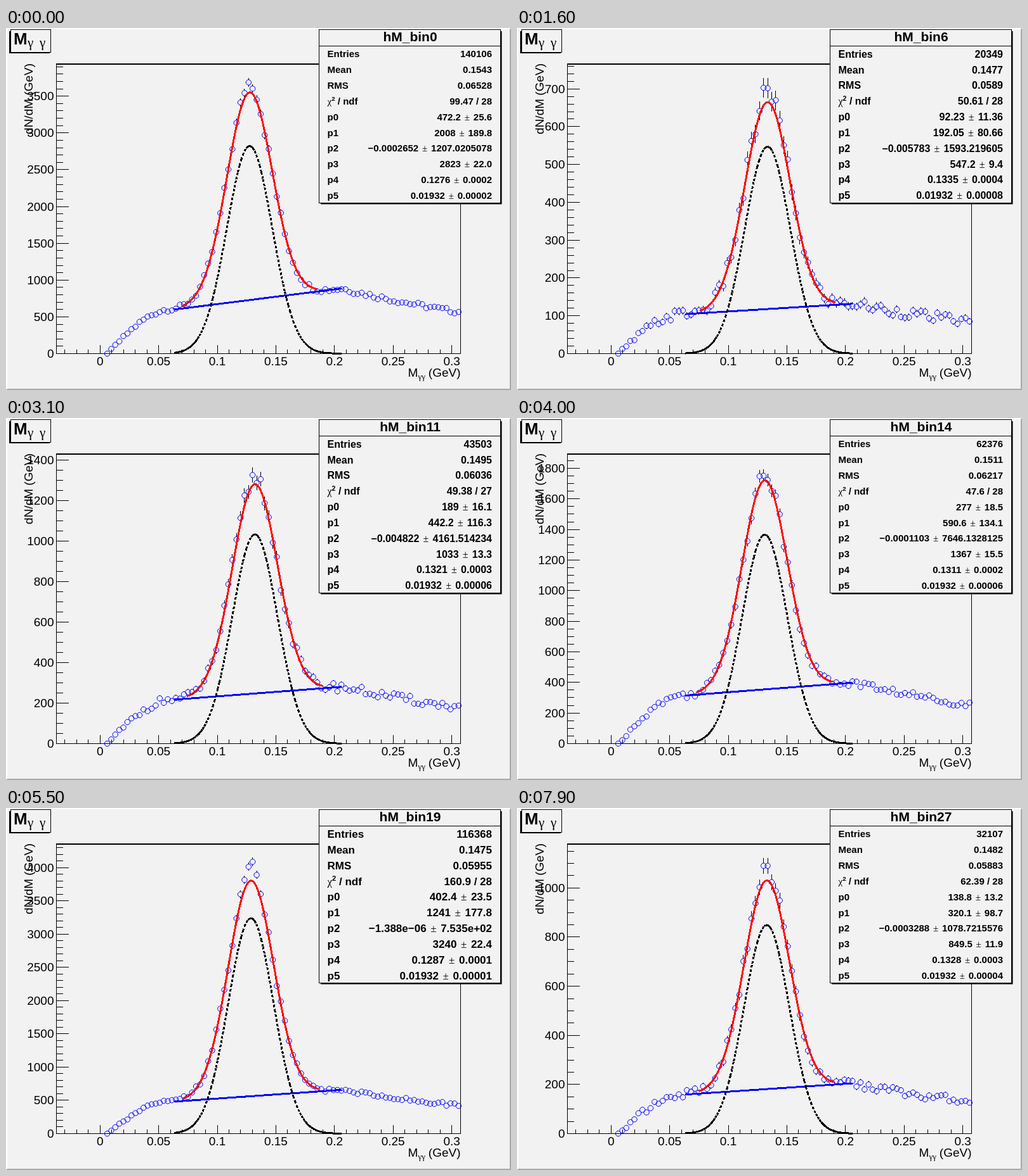
Write an HTML page that moves like this. It is 796 by 572 pixels and loops after 8 s.

```html
<!DOCTYPE html>
<html lang="en">
<head>
<meta charset="utf-8">
<title>Invariant mass fits</title>
<style>
html, body { margin: 0; width: 100%; height: 100%; overflow: hidden; background: #f2f2f2; }
svg { display: block; position: absolute; left: 0; top: 0; font: 19px "Liberation Sans", Arial, sans-serif; }
.sym { font-family: "Liberation Serif", "Times New Roman", serif; font-weight: normal; }
.bold { font-weight: bold; }
.end { text-anchor: end; }
.mid { text-anchor: middle; }
.thin { fill: none; stroke: #000; shape-rendering: crispEdges; }
.fit { fill: none; stroke-width: 3; shape-rendering: crispEdges; }
.box { fill: #f2f2f2; stroke: #000; shape-rendering: crispEdges; }
</style>
</head>
<body>
<svg id="stage" width="796" height="572" viewBox="0 0 796 572"></svg>
<script>
const LEFT = 80, RIGHT = 716.5, TOP = 56.5, BASE = 514.5;
const BIN_W = (RIGHT - LEFT) / 100;
const FIT_LO = .0632, FIT_HI = .2063, DATA_LO = .0064;
const LABELS = ['Entries', 'Mean', 'RMS', '', 'p0', 'p1', 'p2', 'p3', 'p4', 'p5'];

// Printed results of some fits; p0 to p5 also shape the curves. The fits between are blended.
const FITS = [
  { bin: 0, top: 3941, rows: ['140106', '0.1543', '0.06528', '99.47 / 28', '472.2 ± 25.6',
    '2008 ± 189.8', '-0.0002652 ± 1207.0205078', '2823 ± 22.0', '0.1276 ± 0.0002', '0.01932 ± 0.00002'] },
  { bin: 4, top: 530, rows: ['13301', '0.1471', '0.0588', '50.65 / 28', '67.05 ± 9.26',
    '91.21 ± 64.84', '-0.004329 ± 1429.742554', '371.4 ± 7.8', '0.1341 ± 0.0004', '0.01932 ± 0.00010'] },
  { bin: 9, top: 1121, rows: ['30921', '0.1485', '0.05915', '50.56 / 27', '130 ± 14.5',
    '343.3 ± 104.4', '-0.007963 ± 1838.435181', '811 ± 11.8', '0.1327 ± 0.0003', '0.01932 ± 0.00006'] },
  { bin: 14, top: 1895, rows: ['62376', '0.1511', '0.06217', '47.6 / 28', '277 ± 18.5',
    '590.6 ± 134.1', '-0.0001103 ± 7646.1328125', '1367 ± 15.5', '0.1311 ± 0.0002', '0.01932 ± 0.00006'] },
  { bin: 19, top: 4357, rows: ['116368', '0.1475', '0.05955', '160.9 / 28', '402.4 ± 23.5',
    '1241 ± 177.8', '-1.388e-06 ± 7.535e+02', '3240 ± 22.4', '0.1287 ± 0.0001', '0.01932 ± 0.00001'] },
  { bin: 23, top: 536.5, rows: ['16201', '0.1482', '0.06191', '46.43 / 30', '-40.83 ± 61.03',
    '2425 ± 1082.3', '-8368 ± 5720.1', '335.6 ± 16.1', '0.1316 ± 0.0005', '0.01932 ± 0.00054'] },
  { bin: 27, top: 1180, rows: ['32107', '0.1482', '0.05883', '62.39 / 28', '138.8 ± 13.2',
    '320.1 ± 98.7', '-0.0003288 ± 1078.7215576', '849.5 ± 11.9', '0.1328 ± 0.0003', '0.01932 ± 0.00004'] }
];

const lerp = (a, b, u) => a + (b - a) * u;
const px = x => 148.2 + 1848 * x;
const massAt = p => (p - 148.2) / 1848;

function noise(k, bin) {
  const s = Math.sin(k * 12.9898 + bin * 78.233) * 43758.5453;
  return (s - Math.floor(s)) * 2 - 1;
}

function mixText(a, b, u) {
  if (!u) return a;
  const other = b.split(' ');
  return a.split(' ').map((w, i) => isNaN(w) ? w :
    lerp(+w, +other[i], u).toFixed((w.split('.')[1] || '').length)).join(' ');
}

function fitOf(bin) {
  const i = FITS.findLastIndex(f => f.bin <= bin);
  const a = FITS[i], b = FITS[i + 1] || a;
  const u = a === b ? 0 : (bin - a.bin) / (b.bin - a.bin);
  const rows = a.rows.map((r, j) => mixText(r, b.rows[j], u));
  const [p0, p1, p2, p3, p4, p5] = rows.slice(4).map(parseFloat);
  const top = lerp(a.top, b.top, u);
  const back = x => p0 + p1 * x + p2 * x * x;
  const peak = x => p3 * Math.exp(-(((x - p4) / p5) ** 2) / 2);
  const total = x => back(x) + peak(x);
  return { bin, rows, top, scale: (BASE - TOP) / top, mean: p4, sigma: p5, back, peak, total };
}

const text = (x, y, s, cls = '', size = 19, more = '') =>
  `<text x="${x}" y="${y}" class="${cls}" font-size="${size}" ${more}>${s}</text>`;
const rect = (x, y, w, h, attr) => `<rect x="${x}" y="${y}" width="${w}" height="${h}" ${attr}/>`;
const path = (d, attr) => `<path d="${d}" ${attr}/>`;

function axes({ top, scale }) {
  let ticks = '', out = '';
  for (let i = -3; i <= 30; i++) {
    const major = i % 5 === 0;
    ticks += `M${px(i / 100)} ${BASE}v${major ? -14 : -7}`;
    if (major) out += text(px(i / 100), 533, i / 100, 'mid');
  }
  const pow = 10 ** Math.floor(Math.log10(top / 10));
  const lead = [1, 2, 5, 10].find(m => top / (m * pow) <= 10);
  const parts = lead === 2 ? 4 : 5;
  for (let i = 0; i * lead * pow / parts <= top; i++) {
    const v = i * lead * pow / parts, y = BASE - v * scale, major = i % parts === 0;
    ticks += `M${LEFT} ${y}h${major ? 19 : 10}`;
    if (major) out += text(75.5, y + 6.5, v, 'end');
  }
  return rect(79.5, 56.5, 637, 458, 'class="thin"') + rect(79, 56, 638, 2, '') +
    path(ticks, 'class="thin"') + out +
    text(0, 0, 'dN/dM (GeV)', 'end', 19, 'transform="translate(42 56) rotate(-90)"') +
    text(633.5, 551, 'M') + text(649.5, 555, 'γγ', 'sym', 13) + text(716.5, 551, '(GeV)', 'end');
}

// Expected counts: a rise to the fit range, the fit with a sharper tip, then a slow decay.
function expected(x, f, highest) {
  if (x < FIT_LO) {
    const u = (x - DATA_LO) / (FIT_LO - DATA_LO);
    return f.total(FIT_LO) * Math.sin(u * Math.PI / 2);
  }
  if (x > FIT_HI) return f.back(FIT_HI) * Math.exp(-4.5 * (x - FIT_HI));
  const tip = highest - f.total(f.mean);
  return f.total(x) + tip * Math.exp(-(((x - f.mean) / .008) ** 2));
}

function markers(f) {
  // The axis ends 5% above the error bar of the highest marker.
  const bar = f.top / 1.05, highest = bar - Math.sqrt(bar);
  let rings = '', bars = '';
  for (let k = 12; k < 100; k++) {
    const x = LEFT + BIN_W * (k + .5);
    const mean = Math.max(0, expected(massAt(x), f, highest));
    const n = Math.min(highest, mean + 1.3 * noise(k, f.bin) * Math.sqrt(mean));
    const y = BASE - Math.max(0, n) * f.scale, err = Math.sqrt(Math.max(0, n)) * f.scale;
    rings += `<circle cx="${x}" cy="${y}" r="4.2"/>`;
    if (err > 4) bars += `M${x} ${y - err}V${y - 4}M${x} ${y + 4}V${y + err}`;
  }
  return path(bars, 'class="thin"') + `<g fill="none" stroke="#00f">${rings}</g>`;
}

// With split on, every segment is its own subpath, so the dashes restart there.
function curve(fn, from, to, scale, attr, split) {
  let d = '', last = '';
  for (let i = 0; i <= 100; i++) {
    const x = lerp(from, to, i / 100);
    const pt = `${px(x).toFixed(2)} ${(BASE - fn(x) * scale).toFixed(2)}`;
    if (i) d += split ? `M${last}L${pt}` : `L${pt}`;
    else if (!split) d = `M${pt}`;
    last = pt;
  }
  return path(d, `class="fit" ${attr}`);
}

function statBox({ bin, rows }) {
  const size = Math.min(20, Math.round(375 / Math.max(...rows.map(r => r.length))));
  const chi = `<tspan class="sym">χ</tspan><tspan font-size="${size * .66}" dy="${-size * .36}">2</tspan>` +
    `<tspan dy="${size * .36}"> / ndf</tspan>`;
  let out = rect(496, 5, 285.5, 273.5, '') + rect(493.5, 2.5, 286, 274, 'class="box"') +
    path('M493 28.5H779', 'class="thin"') + text(637, 21, 'hM_bin' + bin, 'bold mid', 21);
  rows.forEach((r, i) => {
    const y = 41 + i * 24.83 + size * .36;
    const value = r.replace(/-/g, '−').replace('±', '<tspan class="sym">±</tspan>');
    out += text(506.5, y, LABELS[i] || chi, 'bold', size) +
      text(766, y, value, 'bold end', size, r.includes('±') ? 'word-spacing=".11em"' : '');
  });
  return out;
}

const titleBox = () => rect(5, 5, 64, 35, '') + rect(7.5, 2.5, 63, 36, 'class="box"') +
  text(12, 26, 'M', 'bold', 26) + text(34, 30, 'γ', 'sym', 21) + text(53, 30, 'γ', 'sym', 21);

function draw(bin) {
  const f = fitOf(bin);
  document.getElementById('stage').innerHTML =
    rect(0, 0, 796, 572, 'fill="#f2f2f2"') +
    path('M0 0H796L794 2H2V570L0 572Z', 'fill="#fff"') +
    path('M796 572H0L2 570H794V2L796 0Z', 'fill="#a9a9a9"') +
    axes(f) + markers(f) +
    curve(f.total, f.mean - 3 * f.sigma, f.mean + 3 * f.sigma, f.scale, 'stroke="#f00"') +
    curve(f.back, FIT_LO, FIT_HI, f.scale, 'stroke="#00f"') +
    curve(f.peak, FIT_LO, FIT_HI, f.scale, 'stroke="#000" stroke-dasharray="4 3"', true) +
    statBox(f) + titleBox();
}

let shown = -1;
function tick(now) {
  const t = now % 8000;
  const bin = t < 100 ? 0 : 1 + Math.floor((t - 100) / 300);
  if (bin !== shown) draw(shown = bin);
  requestAnimationFrame(tick);
}
draw(shown = 0);
requestAnimationFrame(tick);
</script>
</body>
</html>
```
